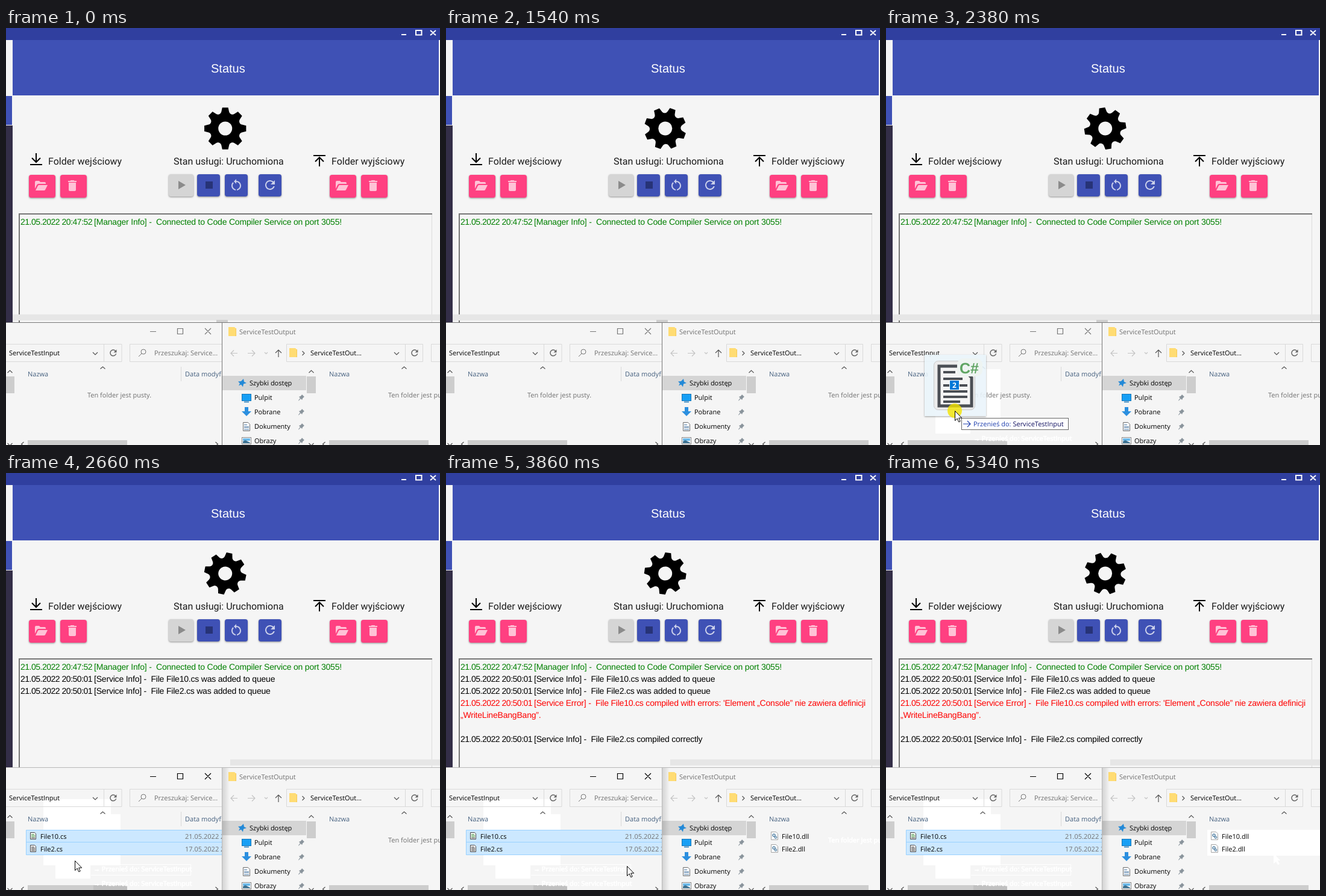
An HTML page that plays this animation: 720 px wide and 693 px high, repeating every 5420 ms.

```html
<!DOCTYPE html>
<html lang="pl">
<head>
<meta charset="utf-8">
<title>Status</title>
<style>
html, body { margin: 0; width: 100%; height: 100%; overflow: hidden; background: #f5f5f5; }
svg { display: block; width: 720px; height: 693px; }
text { font: 11px "Open Sans", "Noto Sans", sans-serif; fill: #000; white-space: pre; text-rendering: geometricPrecision; }
.app text { font: 16px Roboto, sans-serif; fill: #1b1b1b; }
.app .title { font: 20px "Liberation Sans", Arial, sans-serif; fill: #fff; }
.app .log text { font: 14px "Liberation Sans", Arial, sans-serif; letter-spacing: -.2px; fill: #000; }
.app .log .ok { fill: #008000; }
.app .log .bad { fill: #f00; }
.stamp { letter-spacing: -.49px; }
.head { fill: #45607f; }
.dim { fill: #707070; }
.line { fill: none; stroke: #555; stroke-width: 1.2; }
.box { fill: none; stroke: #d9d9d9; }
.thumb { fill: #cdcdcd; }
.ghost { fill: #fff; stroke: #fff; stroke-width: .7; }
.btn { filter: drop-shadow(0 1px 1px rgba(0,0,0,.25)) drop-shadow(0 1px 1.5px rgba(0,0,0,.18)); }
</style>
</head>
<body>
<svg viewBox="0 0 720 693">
<defs>
  <path id="refresh" d="M17.65 6.35C16.2 4.9 14.2 4 12 4c-4.42 0-8 3.58-8 8s3.58 8 8 8c3.73 0 6.84-2.55 7.73-6h-2.08c-.82 2.33-3.04 4-5.65 4-3.31 0-6-2.69-6-6s2.69-6 6-6c1.66 0 3.14.69 4.22 1.78L13 11h7V4z"/>
  <path id="restart" d="M12 5V2L8 6l4 4V7c3.31 0 6 2.69 6 6 0 2.97-2.17 5.43-5 5.91v2.02c3.95-.49 7-3.85 7-7.93 0-4.42-3.58-8-8-8zM6 13c0-1.65.67-3.15 1.76-4.24L6.34 7.34C4.9 8.79 4 10.79 4 13c0 4.08 3.05 7.44 7 7.93v-2.02c-2.83-.48-5-2.94-5-5.91z"/>
  <g id="pinkPair">
    <g class="btn" fill="#ff4081"><rect width="44" height="38" rx="4"/><rect x="52" width="44" height="38" rx="4"/></g>
    <path fill="#ffc2d6" d="M10 23V12q0-2 2-2h5l2 2h7q2 0 2 2v1H16q-2 0-3 2zM11 26l4-8q.6-1 2-1h14l-4 8q-.6 1-2 1z"/>
    <path fill="#ffc2d6" d="M66 25c0 1.100.9 2 2 2h8c1.100 0 2-.9 2-2V13H66zM79 10h-3.500l-1-1h-5l-1 1H65v2h14z"/>
  </g>
  <g id="folder"><path fill="#f5c95a" d="M10 2h3v13h-3z"/><path fill="#ffdc73" d="M0 0h10l2 2v12l-1 1H0z"/></g>
  <path id="pin" fill="#8a949c" d="M6 0l4 4-1 .6-2.300 2.300q.3 1.500-.7 2.100L4 7 .5 10.500 0 10l3-4-2-2q.9-1 2.200-.7L5.500 1z"/>
  <g id="csFile"><path fill="#fff" stroke="#444" d="M.5.500h7l2 2v9h-9z"/><path stroke="#444" d="M2 3.500h5M2 5.500h6M2 7.500h6M2 9.500h6"/></g>
  <g id="dllFile"><path fill="#fff" stroke="#a5a5a5" d="M.5.500h8l3 3v10H.5z"/><circle cx="5" cy="6" r="2" fill="none" stroke="#5b87a8" stroke-width="1.500"/><circle cx="8" cy="9.500" r="1.700" fill="none" stroke="#5b87a8" stroke-width="1.300"/></g>
  <!-- parts both file windows share, relative to the list column -->
  <g id="listParts">
    <path class="line" d="M144 539l4 4 4-4"/>
    <use href="#refresh" fill="#666" transform="translate(169.500 531.500) scale(.7)"/>
    <path class="line" d="M156.500 566.500l4-3.500 4 3.500M29.500 688l-4 3.500 4 3.500"/>
    <text class="head" x="36" y="579">Nazwa</text>
    <rect class="thumb" x="36" y="685" width="165" height="8"/>
  </g>
  <g id="vbar">
    <rect class="thumb" x="-1" y="579" width="15" height="28"/>
    <path class="line" stroke-width="1.500" d="M2.500 573l4-4 4 4M2.500 690l4 4 4-4"/>
  </g>
  <path id="arrow" fill="#fff" stroke="#000" d="M.5.500v16l3.700-3.500 2.500 5.700 2.500-1-2.500-5.600h5z"/>
  <linearGradient id="shade"><stop stop-color="#000" stop-opacity=".14"/><stop offset="1" stop-color="#000" stop-opacity="0"/></linearGradient>
</defs>

<rect width="720" height="693" fill="#f5f5f5"/>
<g class="app">
  <rect width="720" height="20" fill="#303f9f"/>
  <path d="M656 11h8M680 4h9.500v7.500H680zM704 4l9 8M713 4l-9 8" fill="none" stroke="#fff" stroke-width="2"/>
  <rect x="11" y="20" width="707" height="92" fill="#3f51b5"/>
  <rect y="113" width="10" height="48" fill="#3f51b5"/>
  <rect y="162" width="11" height="328" fill="#332e47"/>
  <text class="title" x="340" y="74">Status</text>

  <path id="gear" fill-rule="evenodd"/>

  <path d="M50 208v15M43 216l7 7 7-7M40 227h20M520 230v-15M513 222l7-7 7 7M510 212h20" fill="none" stroke="#000" stroke-width="2"/>
  <text x="70" y="227">Folder wejściowy</text>
  <text x="278" y="227">Stan usługi: Uruchomiona</text>
  <text x="540" y="227">Folder wyjściowy</text>
  <use href="#pinkPair" x="38" y="244"/>
  <use href="#pinkPair" x="537" y="244"/>
  <rect class="btn" x="270" y="243" width="41" height="37" rx="4" fill="#d5d5d5"/>
  <g class="btn" fill="#3f51b5">
    <rect x="317" y="243" width="38" height="37" rx="4"/>
    <rect x="363" y="243" width="38" height="37" rx="4"/>
    <rect x="419" y="243" width="38" height="37" rx="4"/>
  </g>
  <path d="M286 254l12 7-12 7z" fill="#8b8b8b"/>
  <rect x="331" y="255" width="12" height="12" fill="#273377"/>
  <g fill="#cbd0ea"><use href="#restart" x="370" y="249"/><use href="#refresh" x="426" y="249"/></g>

  <path d="M707 309H22v181" fill="none" stroke="#767676" stroke-width="2"/>
  <path d="M706.500 310v180" stroke="#dcdcdc"/>
  <g class="log">
    <text class="ok" x="24" y="327"><tspan class="stamp">21.05.2022 20:47:52 </tspan><tspan x="146">[Manager Info] -  Connected to Code Compiler Service on port 3055!</tspan></text>
    <g data-from="2660">
      <text x="24" y="347"><tspan class="stamp">21.05.2022 20:50:01 </tspan><tspan x="146">[Service Info] -  File File10.cs was added to queue</tspan></text>
      <text x="24" y="367"><tspan class="stamp">21.05.2022 20:50:01 </tspan><tspan x="146">[Service Info] -  File File2.cs was added to queue</tspan></text>
    </g>
    <g data-from="2840">
      <text class="bad" x="24" y="387"><tspan class="stamp">21.05.2022 20:50:01 </tspan><tspan x="146">[Service Error] -  File File10.cs compiled with errors: 'Element „Console” nie zawiera definicji</tspan></text>
      <text class="bad" x="24" y="407">„WriteLineBangBang”.</text>
      <text x="24" y="447"><tspan class="stamp">21.05.2022 20:50:01 </tspan><tspan x="146">[Service Info] -  File File2.cs compiled correctly</tspan></text>
    </g>
  </g>
  <rect x="372" y="476" width="348" height="10" fill="#e6e6e6"/>
  <g data-to="2480">
    <rect x="11" y="476" width="361" height="10" fill="#e6e6e6"/>
    <rect x="349" y="485" width="19" height="4" fill="#cfcfcf"/>
  </g>
</g>

<!-- input folder -->
<rect y="489" width="359" height="204" fill="#f5f5f5"/>
<g data-from="1920" fill="#fff">
  <rect x="82" y="567" width="108" height="85"/>
  <rect x="82" y="652" width="58" height="22"/>
</g>
<path data-from="2480" fill="#fff" d="M62 542h112v25h16v85H62z"/>
<path class="line" id="winBtns" d="M239 504.500h10M284.500 499.500h9v9h-9zM330 499l10 10M340 499l-10 10"/>
<path class="box" d="M-1 525.500h193v29H-1M162.500 525.500v29M358 525.500H205.500v29H358M290.500 563v24"/>
<text x="5" y="544">ServiceTestInput</text>
<g fill="none" stroke="#777"><circle cx="228" cy="538" r="4"/><path d="M225 541l-5 5"/></g>
<text class="dim" x="246" y="544">Przeszukaj: Service...</text>
<use href="#listParts"/>
<rect data-from="2480" x="145" y="685" width="56" height="8" fill="#c0c0c0"/>
<use href="#vbar"/>
<path class="line" d="M347.500 688l4 3.500-4 3.500"/>
<text class="head" x="297" y="579">Data modyf</text>
<text class="dim" data-to="2480" x="135" y="614">Ten folder jest pusty.</text>
<g data-from="2480">
  <path d="M33.500 593.500H360v41H33.500zM33.500 613.500H360" fill="#cce8ff" stroke="#99d1ff"/>
  <use href="#csFile" x="40" y="597"/><path d="M42 600.500h5M42 602.500h6M42 604.500h6" stroke="#4c9a4c"/>
  <use href="#csFile" x="40" y="618"/>
  <text x="57" y="608">File10.cs</text><text x="57" y="629">File2.cs</text>
  <text class="dim" x="297" y="608">21.05.2022 20:49</text><text class="dim" x="297" y="629">17.05.2022 21:12</text>
  <path d="M190 650.500h116.500v18H141" fill="none" stroke="#fff"/>
  <text class="ghost" x="145" y="662">→ Przenieś do: ServiceTestInput</text>
</g>
<text class="ghost" data-from="1920" x="145" y="686">→ Przenieś do: ServiceTestInput</text>

<!-- output folder -->
<rect x="358" y="489" width="362" height="204" fill="#f5f5f5"/>
<path id="borders" d="M0 489.500h720M358.500 490v203"/>
<use href="#folder" x="369" y="497"/>
<text class="dim" x="387" y="509">ServiceTestOutput</text>
<path d="M384 540.500h-11m5-5l-5 5 5 5M401 540.500h12m-5-5l5 5-5 5M429 539l2.500 2.500 2.500-2.500" fill="none" stroke="#c4c4c4" stroke-width="1.200"/>
<path class="line" stroke-width="1.500" d="M452 547v-12m-5 5l5-5 5 5M491.500 537l3.500 3.500-3.500 3.500"/>
<path class="box" d="M465.500 525.500h226v29h-226zM662.500 525.500v29M721 525.500h-15.500v29H721"/>
<use href="#folder" x="470" y="532"/>
<text x="505" y="544">ServiceTestOut...</text>
<rect x="359" y="578" width="139" height="24" fill="#d5d5d5"/>
<path fill="#2389d7" d="M394 583l1 5 4 2-5 1.500-1 5-3-4-4 2 2-4-3-3 5-.5z"/>
<text x="404" y="594">Szybki dostęp</text>
<rect x="391.500" y="608.500" width="15" height="11" fill="#18a0f5" stroke="#1575b8"/><path d="M395 621.500h8" stroke="#1575b8" stroke-width="1.500"/>
<path fill="#2b8fdf" d="M396 630h6v7h5l-8 8-8-8h5z"/>
<path fill="#fff" stroke="#707070" d="M393.500 655.500h8l3 3v11h-11z"/><path stroke="#4f7ba6" d="M395 659.500h5M395 662.500h8M395 664.500h8M395 667.500h8"/>
<rect x="391.500" y="680.500" width="15" height="11" fill="#fff" stroke="#888"/><path fill="#69b7e8" d="M393 682h12v4h-12z"/><path fill="#3b6f8f" d="M393 690v-3l4-2 8 4v1z"/>
<text x="412" y="618">Pulpit</text><text x="412" y="642">Pobrane</text><text x="412" y="666">Dokumenty</text><text x="412" y="690">Obrazy</text>
<use href="#pin" x="485" y="609"/><use href="#pin" x="485" y="633"/><use href="#pin" x="485" y="657"/><use href="#pin" x="485" y="681"/>
<rect data-from="2480" x="359" y="490" width="12" height="203" fill="url(#shade)"/>
<use href="#vbar" x="500"/>
<use href="#listParts" x="500"/>
<text class="dim" data-to="2840" x="634" y="614">Ten folder jest pusty.</text>
<g data-from="2840">
  <text class="ghost" x="634" y="614">Ten folder jest pusty.</text>
  <rect data-from="4120" data-to="4320" x="533" y="614" width="180" height="21" fill="#e5f3ff"/>
  <g data-from="4320" fill="#fff"><rect x="533" y="593" width="187" height="43"/><path d="M643 632v17l4-3 3 5 3-1-3-6h4z"/></g>
  <use href="#dllFile" x="539" y="596"/><use href="#dllFile" x="539" y="617"/>
  <text x="557" y="608">File10.dll</text><text x="557" y="629">File2.dll</text>
</g>

<!-- dragged files -->
<g id="drag" data-from="1640" data-to="2480">
  <rect class="btn" x="64" y="543" width="102" height="102" fill="#eaf5fb" opacity=".9"/>
  <rect x="79.500" y="553.500" width="68" height="81" rx="7" fill="#ececec" stroke="#c9c9c9"/>
  <path d="M88 562h35l19 19v47H88z" fill="#f4f4f4" stroke="#4b4f55" stroke-width="5"/>
  <path d="M95 572h20M95 583h32M95 594h40M95 604h40M95 613h40M95 621h28" stroke="#4b4f55" stroke-width="4"/>
  <rect x="118" y="549" width="42" height="30" rx="10" fill="#eef4f2"/>
  <text x="122" y="574" style="font:bold 25px 'Liberation Sans',sans-serif;fill:#5fa463">C#</text>
  <rect x="105.500" y="585.500" width="16" height="16" fill="#0078d7" stroke="#fff"/>
  <text x="110" y="598" style="font-size:12px;font-weight:bold;fill:#fff">2</text>
  <circle cx="114" cy="636" r="12" fill="#f4e400" opacity=".8"/>
  <rect x="125.500" y="648.500" width="177" height="19" fill="#fff" stroke="#666"/>
  <path d="M128 658h12m-5-5l5 5-5 5" fill="none" stroke="#1f3fae" stroke-width="1.200"/>
  <text x="145" y="662"><tspan fill="#1f3fae">Przenieś do: </tspan><tspan fill="#101060">ServiceTestInput</tspan></text>
  <use href="#arrow" x="114" y="636"/>
</g>
<use id="cursor" href="#arrow" data-from="2480" data-to="4320"/>
</svg>

<script>
const LOOP = 5420, SPIN = 5000, DROP = 2480;
const $ = id => document.getElementById(id);

// Screen refresh moments: [start, steps] per block, snapped to 20 ms.
const blocks = [[80, 7], [720, 7], [1360, 6], [1920, 6], [2480, 7], [3120, 6], [3680, 7], [4320, 6], [4880, 6]];
const ticks = [0];
blocks.forEach(([start, n], b) => {
  const end = b + 1 < blocks.length ? blocks[b + 1][0] : 5440;
  for (let k = 0; k < n; k++) ticks.push(Math.floor((start + (end - start) * k / n) / 20) * 20);
});

// [time, x, y]
const dragPath = [[1640, 36, 112], [1720, 28, 62], [1820, 20, 25], [1920, 0, 0]];
const cursorPath = [[2480, 114, 636], [2660, 114, 644], [3580, 114, 644], [3680, 118, 646], [3860, 300, 653], [4040, 560, 648], [4120, 643, 632]];

function at(path, t) {
  const i = path.findIndex(p => p[0] > t);
  if (i === 0) return path[0].slice(1);
  if (i < 0) return path[path.length - 1].slice(1);
  const a = path[i - 1], b = path[i], f = (t - a[0]) / (b[0] - a[0]);
  return [a[1] + (b[1] - a[1]) * f, a[2] + (b[2] - a[2]) * f];
}

const polar = (r, deg) => {
  const a = deg * Math.PI / 180;
  return (r * Math.cos(a)).toFixed(2) + " " + (r * Math.sin(a)).toFixed(2);
};

// Eight tapered teeth joined by rounded valleys, with a round hole.
function gearPath() {
  let d = "M" + polar(35, -8);
  for (let a = 0; a < 360; a += 45)
    d += `L${polar(35, a + 8)}L${polar(28.5, a + 13)}C${polar(25, a + 17)} ${polar(25, a + 28)} ${polar(28.5, a + 32)}L${polar(35, a + 37)}`;
  return d + "ZM11.500 0A11.500 11.500 0 1 0 -11.500 0A11.500 11.500 0 1 0 11.500 0Z";
}
$("gear").setAttribute("d", gearPath());

const timed = [...document.querySelectorAll("[data-from],[data-to]")].map(el => ({
  el, from: +(el.dataset.from || 0), to: +(el.dataset.to || LOOP)
}));
const place = (el, [x, y]) => el.setAttribute("transform", `translate(${Math.round(x)} ${Math.round(y)})`);

function draw(now) {
  const t = ticks.filter(k => k <= now).pop();
  $("gear").setAttribute("transform", `translate(363.700 167) rotate(${t / SPIN * 360})`);
  for (const { el, from, to } of timed) el.style.display = t >= from && t < to ? "" : "none";
  $("winBtns").style.stroke = t < DROP ? "#777" : "#000";
  $("borders").style.stroke = t < DROP ? "#777" : "#b8b8b8";
  place($("drag"), at(dragPath, t));
  place($("cursor"), at(cursorPath, t));
}

const begin = performance.now();
function loop() {
  draw((performance.now() - begin) % LOOP);
  requestAnimationFrame(loop);
}
loop();
</script>
</body>
</html>
```
